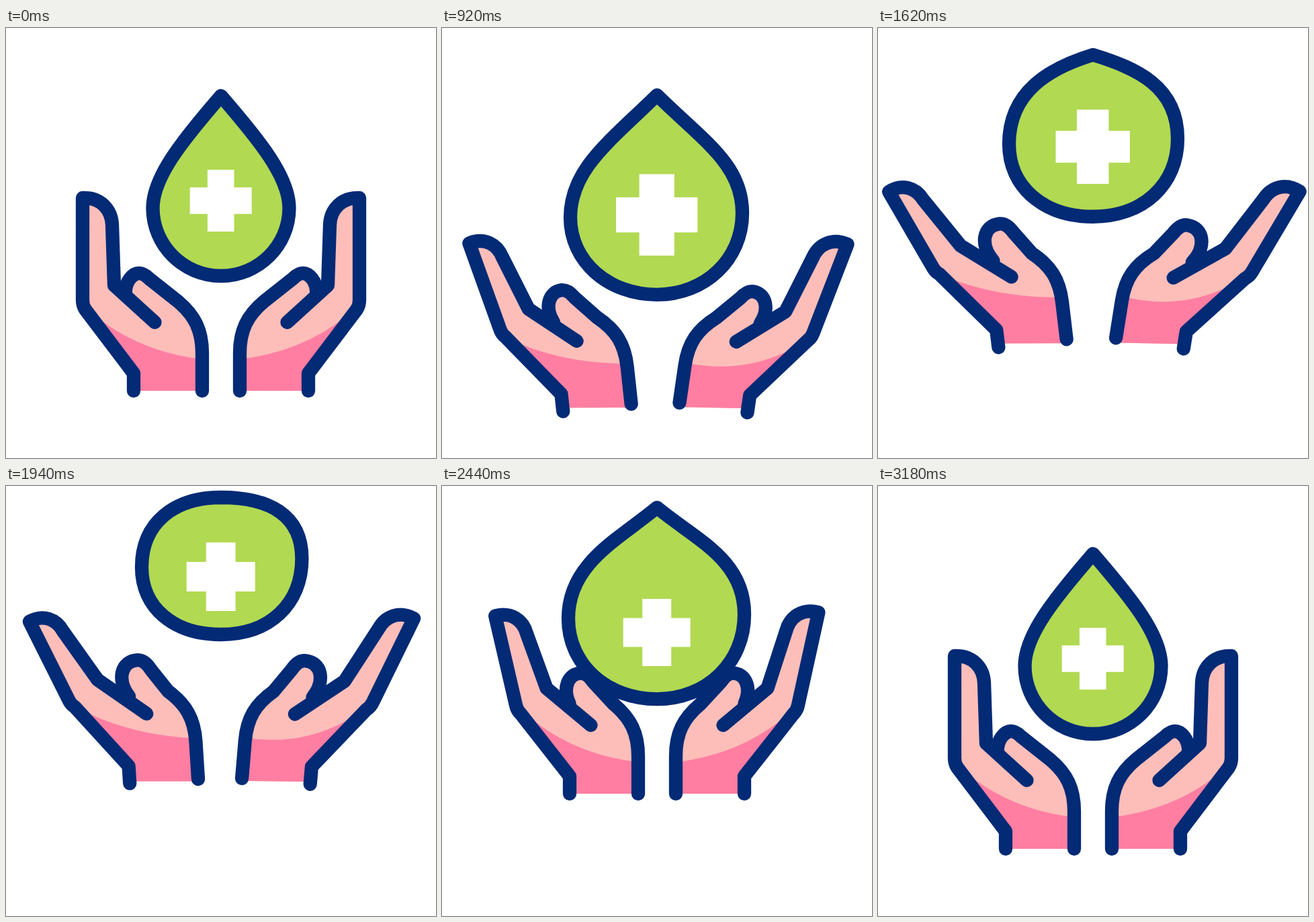
An HTML page that plays this animation: 640x640 px, repeating every 3600 ms.

```html
<!DOCTYPE html>
<html lang="en">
<head>
<meta charset="utf-8">
<title>Caring hands</title>
<style>
  html, body { margin: 0; width: 100%; height: 100%; overflow: hidden; background: #fff; }
  svg { display: block; width: 100vw; height: 100vh; }
  .line { fill: none; stroke: #032a75; stroke-width: 20.3; stroke-linecap: round; stroke-linejoin: round; }
  .skin { fill: #fdbeb9; }
  .shade { fill: #ff7ea2; }
  #body { fill: #b1d951; }
  #cross { fill: #fff; }
</style>
</head>
<body>
<svg viewBox="0 0 640 640">
  <path id="body" class="line"/>
  <path id="cross"/>
  <g transform="translate(640 0) scale(-1 1)"><g id="right"></g></g>
  <g id="left"></g>
</svg>
<script>
const LOOP = 3600;
const RAD = Math.PI / 180;

const mix = (a, b, k) => a + (b - a) * k;
const mixPoint = (a, b, k) => [mix(a[0], b[0], k), mix(a[1], b[1], k)];
const mixAll = (a, b, k) => a.map((p, i) => mixPoint(p, b[i], k));

// Eased progress from 0 to 1 between two times
function phase(t, start, end) {
  const u = Math.min(1, Math.max(0, (t - start) / (end - start)));
  return u * u * (3 - 2 * u);
}

// Smooth curve through [time, value] points, without overshoot
function curve(points) {
  const last = points.length - 1;
  const secant = i => (points[i + 1][1] - points[i][1]) / (points[i + 1][0] - points[i][0]);
  const slopes = points.map((_, i) => {
    if (i === 0 || i === last) return 0;
    const a = secant(i - 1), b = secant(i);
    return a * b <= 0 ? 0 : 2 * a * b / (a + b);
  });
  return t => {
    if (t <= points[0][0]) return points[0][1];
    if (t >= points[last][0]) return points[last][1];
    const i = points.findIndex(p => p[0] > t) - 1;
    const [t0, v0] = points[i], [t1, v1] = points[i + 1];
    const span = t1 - t0, u = (t - t0) / span;
    return mix(v0, v1, phase(t, t0, t1)) +
      span * u * (1 - u) * ((1 - u) * slopes[i] - u * slopes[i + 1]);
  };
}

const lift = curve([[340, 0], [1120, 30], [1280, 20], [1620, -70.5], [1940, -100.5], [2190, -105], [3020, 0]]);
const opening = curve([[340, 0], [1250, 1], [1700, 1.08], [1940, 1.06], [2440, .64], [3020, 0]]);
const wristAngle = t => -7.4 * (phase(t, 340, 1120) - phase(t, 1450, 2420));
const shadeBend = t => phase(t, 340, 1120) - phase(t, 1800, 2400);

// Finger runs from the palm corner over the tip to its inner side
const KNUCKLE = [114, 405];
const finger = [[118, 419], [114, 413], KNUCKLE, [114, 253], [141, 252], [157, 270], [158, 293]];
const valley = [[161, 383], [152.5, 383]];
const thumb = [[178, 398], [176, 376], [190, 365], [198, 365], [204, 365], [209, 369], [213, 373]];
const thumbOpen = [[196, 410], [180, 385], [188, 358], [212, 358], [221, 358], [227, 366], [231, 373]];

// The open finger leans outward around the knuckle and looks shorter
function leanFinger(degrees, scale) {
  const c = Math.cos(degrees * RAD) * scale, s = Math.sin(degrees * RAD) * scale;
  return finger.map(([x, y]) => {
    const dx = x - KNUCKLE[0], dy = y - KNUCKLE[1];
    return [KNUCKLE[0] - 6 + dx * c - dy * s, KNUCKLE[1] + 6 + dx * s + dy * c];
  });
}

function makeHand(id, { lean, length, turn, drift, shadeSag }) {
  const group = document.getElementById(id);
  const fingerOpen = leanFinger(lean, length);
  const [skin, shade, thumbLine, palmLine] = ['skin', 'shade', 'line', 'line'].map(name => {
    const path = document.createElementNS('http://www.w3.org/2000/svg', 'path');
    path.setAttribute('class', name);
    return group.appendChild(path);
  });
  return t => {
    const k = opening(t), bend = shadeBend(t);
    const angle = wristAngle(t), turned = angle * turn;
    const f = mixAll(finger, fingerOpen, k);
    const h = mixAll(thumb, thumbOpen, k);

    // The cut edge of the wrist stays almost level while the hand turns
    const sag = 45 * Math.sin(mix(angle, turned, .55) * RAD);
    const wrist = `L286 ${540 - sag}L196 ${540 + sag}L190 514`;
    const outer = `L${f[0]}Q${f[1]} ${f[2]}L${f[3]}C${f[4]} ${f[5]} ${f[6]}L${mixPoint(...valley, k)}`;
    const inner = `${h[0]}C${h[1]} ${h[2]} ${h[3]}C${h[4]} ${h[5]} ${h[6]}L256 407C281 428 292 450 292 484`;
    const from = mixPoint([135, 430], [120, 424], bend);
    const via = [mix(200, 196, bend), mix(482, shadeSag, bend)];

    skin.setAttribute('d', `M190 514${outer}L${inner}${wrist}Z`);
    shade.setAttribute('d', `M${from}Q${via} 292 ${mix(493, 477, bend)}${wrist}Z`);
    thumbLine.setAttribute('d', `M${inner}V540`);
    palmLine.setAttribute('d', `M190 540V514${outer}L221.5 438`);
    group.setAttribute('transform',
      `translate(${turned * drift} ${lift(t)}) rotate(${turned} 241 540)`);
  };
}

const hands = [
  makeHand('left', { lean: -21.5, length: .87, turn: 1, drift: 1.62, shadeSag: 467 }),
  makeHand('right', { lean: -20, length: .92, turn: 1.33, drift: .6, shadeSag: 487 })
];

// Drop: dx and dy place the shoulder below the tip, lean raises the right side
const rest = { tip: 101, dx: 58, dy: 67, handle: 46, mid: 320, half: 101.5, side: 268, lean: 0,
  bottom: 369, full: .55, crossY: 257, crossSize: 92 };
const wide = { tip: 99.5, dx: 75, dy: 70.5, handle: 81, mid: 318.7, half: 136.7, side: 282.5, lean: 4.5,
  bottom: 406, full: .57, crossY: 285, crossSize: 131 };
const dome = { tip: 40, dx: 65, dy: 20, handle: 78, mid: 320.5, half: 125.5, side: 169, lean: 4,
  bottom: 281, full: .59, crossY: 177, crossSize: 110.5 };
const round = { tip: 17, dx: 70, dy: 0, handle: 66, mid: 321.2, half: 119.2, side: 114.5, lean: 6.5,
  bottom: 221, full: .6, crossY: 135, crossSize: 102 };
const falling = { tip: 32, dx: 58, dy: 48, handle: 82, mid: 319, half: 131, side: 194, lean: 3,
  bottom: 317, full: .57, crossY: 218, crossSize: 100 };
const landed = { ...rest, side: 278, bottom: 382, crossY: 268 };

const moments = [
  [340, rest], [1200, wide], [1280, wide], [1620, dome],
  [1940, round], [2440, falling], [3020, landed], [3180, rest]
];
const dropCurves = Object.keys(rest).map(name =>
  [name, curve(moments.map(([time, pose]) => [time, pose[name]]))]);

function drawDrop(t) {
  const d = Object.fromEntries(dropCurves.map(([name, at]) => [name, at(t)]));
  const cx = 320, shoulder = d.tip + d.dy;
  const lx = d.mid - d.half, ly = d.side + d.lean;
  const rx = d.mid + d.half, ry = d.side - d.lean;
  body.setAttribute('d',
    `M${cx} ${d.tip}C${cx - d.dx} ${shoulder} ${lx} ${ly - d.handle} ${lx} ${ly}` +
    `C${lx} ${mix(ly, d.bottom, d.full)} ${mix(cx, lx, d.full)} ${d.bottom} ${cx} ${d.bottom}` +
    `C${mix(cx, rx, d.full)} ${d.bottom} ${rx} ${mix(ry, d.bottom, d.full)} ${rx} ${ry}` +
    `C${rx} ${ry - d.handle} ${cx + d.dx} ${shoulder} ${cx} ${d.tip}Z`);

  const size = d.crossSize, bar = size * .43, arm = (size - bar) / 2;
  cross.setAttribute('d',
    `M${319.7 - bar / 2} ${d.crossY - size / 2}h${bar}v${arm}h${arm}v${bar}h${-arm}v${arm}` +
    `h${-bar}v${-arm}h${-arm}v${-bar}h${arm}Z`);
}

const body = document.getElementById('body');
const cross = document.getElementById('cross');

function tick() {
  const t = performance.now() % LOOP;
  drawDrop(t);
  hands.forEach(draw => draw(t));
  requestAnimationFrame(tick);
}
tick();
</script>
</body>
</html>
```
